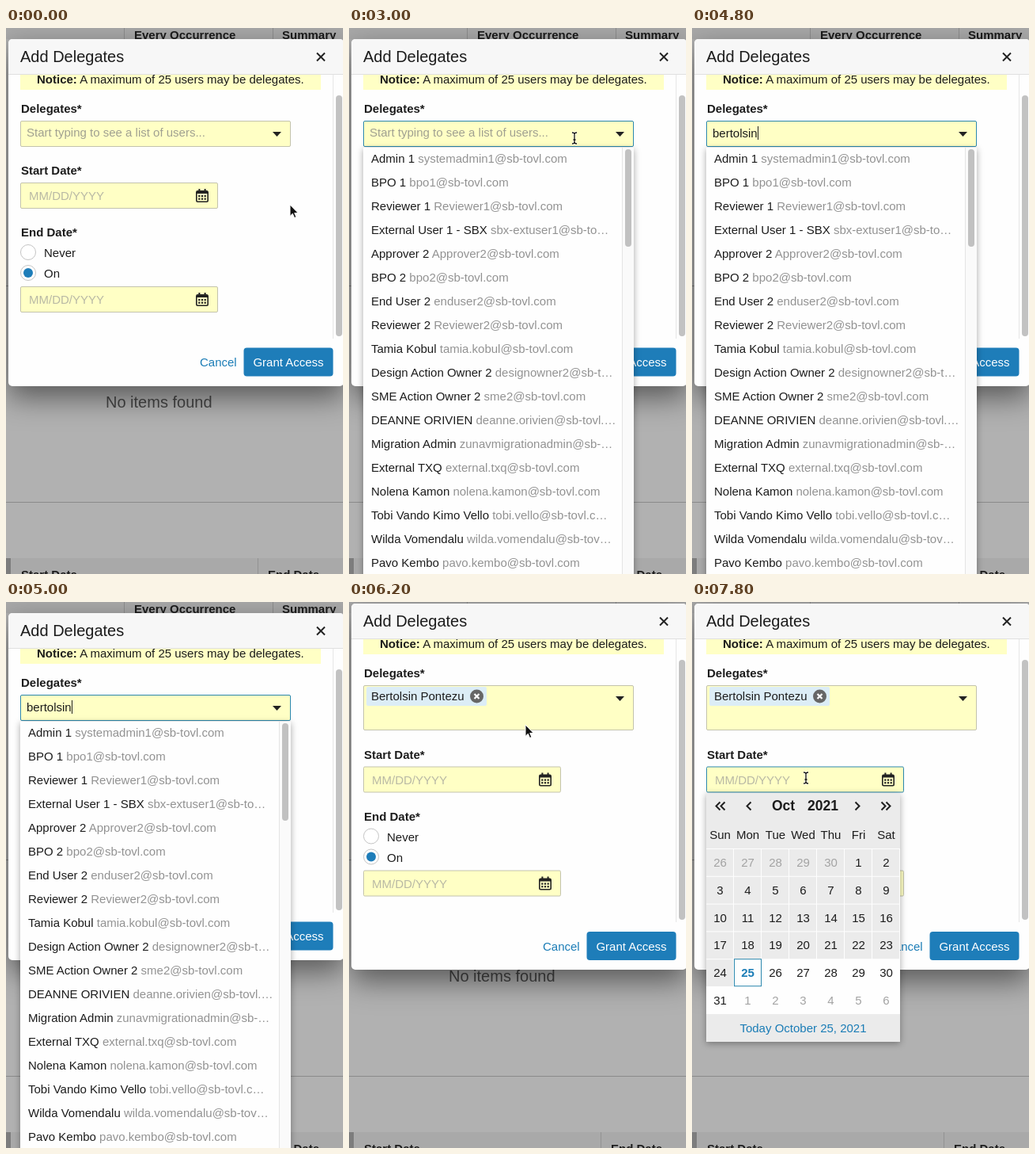
Write an HTML page that moves like this. It is 426x689 px and loops after 8000 ms.

```html
<!DOCTYPE html>
<html lang="en">
<head>
<meta charset="utf-8">
<title>Add Delegates</title>
<style>
  html, body { margin: 0; width: 100%; height: 100%; overflow: hidden; background: #b1b1b1; }
  svg { display: block; width: 426px; height: 689px; }
  text { font: 15px "Liberation Sans", Arial, sans-serif; fill: #1c1c1c; white-space: pre; }
  .b { font-weight: bold; }
  .title { font-size: 20px; }
  .month { font-size: 17.5px; font-weight: bold; }
  .hint { fill: #b9b9a5; }
  .prompt { fill: #a0a091; }
  .mail { fill: #929292; }
  .off { fill: #a3a3a3; }
  .link { fill: #1a7cb6; }
  .white { fill: #fff; }
  .mid { text-anchor: middle; }
  .field { fill: #ffffc5; stroke: #c3c3ad; }
  .focusing { stroke: #9fb3ab; }
  .focus { stroke: #2b87ad; }
  .line { fill: none; stroke: #222; stroke-width: 2; }
  .shadow { filter: drop-shadow(0 14px 18px rgba(0, 0, 0, .5)); }
  .soft { filter: drop-shadow(0 2px 4px rgba(0, 0, 0, .35)); }
</style>
</head>
<body>
<svg id="stage" viewBox="0 0 426 689"></svg>
<script>
const LOOP = 8000, STEP = 200;
const OPEN = 2400, TYPE = 3400, FILTER = 5200, PICK = 6200, FOCUS = 7000, CALENDAR = 7200;
const QUERY = 'bertolsin', PERSON = 'Bertolsin Pontezu';

const text = (x, y, s, cls = '') => `<text x="${x}" y="${y}" class="${cls}">${s}</text>`;
const rect = (x, y, w, h, fill, more = '') =>
  `<rect x="${x}" y="${y}" width="${w}" height="${h}" fill="${fill}" ${more}/>`;
const field = (x, y, w, h, id = '') =>
  `<rect ${id && `id="${id}"`} class="field" x="${x}" y="${y}" width="${w}" height="${h}" rx="1.5"/>`;
const path = (d, more = 'class="line"') => `<path d="${d}" ${more}/>`;
const group = (id, body, more = '') => `<g id="${id}" ${more}>${body}</g>`;
const bold = s => `<tspan class="b">${s}</tspan>`;

function calendarIcon(x, y) {
  let dots = '';
  for (let i = 0; i < 6; i++) dots += rect(x + 3.2 + i % 3 * 3.7, y + 8 + (i > 2) * 3.6, 2.2, 2.2, '#222');
  return rect(x + .8, y + 2.8, 14.4, 13.4, 'none', 'stroke="#222" stroke-width="1.6" rx="1.5"') +
    rect(x + 1, y + 3, 14, 3, '#222') +
    rect(x + 3.4, y, 2, 4, '#222') + rect(x + 10.6, y, 2, 4, '#222') + dots;
}

const dateField = (y, id) => field(18.5, y + .5, 249, 32, id) +
  text(29, y + 22, 'MM/DD/YYYY', 'hint') + calendarIcon(240, y + 8);

const radio = (y, label, on) =>
  `<circle cx="28" cy="${y}" r="9.5" fill="#fff" stroke="#c4c4c4"/>` +
  (on ? `<circle cx="28" cy="${y}" r="6" fill="#1e7db9"/>` : '') + text(48, y + 6, label);

function page() {
  return rect(0, 0, 426, 689, '#b1b1b1') + rect(0, 0, 426, 14, '#a9a9a9') +
    rect(149, 0, 1, 14, '#8e8e8e') + rect(337, 0, 1, 14, '#8e8e8e') +
    text(162, 14, 'Every Occurrence', 'b') + text(349, 14, 'Summary', 'b') +
    rect(0, 325, 4, 1, '#858585') +
    `<text x="126" y="479" class="title" style="fill:#464646">No items found</text>` +
    rect(0, 598, 426, 1, '#8b8b8b') + rect(0, 669, 426, 20, '#a9a9a9') +
    rect(0, 669, 6, 20, '#7d7d7d') + rect(318, 669, 1, 20, '#929292') +
    text(19, 695, 'Start Date', 'b') + text(331, 695, 'End Date', 'b');
}

function dialog() {
  const frame = `<rect id="panel" class="shadow" x="3" width="424" rx="5" fill="#fefefe"/>` +
    rect(413, 46, 1, 346, '#e6e6e6', 'id="track"') +
    rect(417, 85, 8, 304, '#c2c2c2', 'id="thumb" rx="4"');
  const top = path('M3 58V19a5 5 0 0 1 5-5H422a5 5 0 0 1 5 5V58Z', 'fill="#f7f7f7"') +
    rect(3, 58, 424, 1, '#e0e0e0') + text(18, 43, 'Add Delegates', 'title') +
    path('M393 31.500l10 10m0-10l-10 10') +
    rect(18, 59, 380, 19, '#ffffc5') +
    text(39, 70, bold('Notice:') + ' A maximum of 25 users may be delegates.') +
    text(19, 107, 'Delegates*', 'b') +
    field(18.5, 117.5, 341, 32, 'users') +
    path('M337 131h11l-5.500 6Z', 'fill="#222"') +
    `<text id="entry" x="26" y="137"></text>` +
    rect(83, 124, 1, 17, '#222', 'id="entryCaret"') +
    path('M26 139' + 'q1 -2 2 0t2 0'.repeat(14), 'id="squiggle" fill="none" stroke="#e0473c" stroke-width="1.4"') +
    group('chip', rect(22, 119, 152, 24, '#dcedf6', 'rx="2"') + text(28, 136, PERSON) +
      '<circle cx="161.500" cy="131" r="8.500" fill="#666"/>' +
      path('M158.500 128l6 6m0-6l-6 6', 'stroke="#fff" stroke-width="2.200"'));
  const low = text(19, 185, 'Start Date*', 'b') + dateField(195, 'start') +
    rect(29, 203, 1, 17, '#222', 'id="startCaret"') +
    text(19, 263, 'End Date*', 'b') + radio(283, 'Never') + radio(309, 'On', true) + dateField(326) +
    text(245, 427, 'Cancel', 'link') + rect(300.5, 403.5, 113, 36, '#1e7db9', 'rx="4"') +
    text(357, 427, 'Grant Access', 'white mid');
  return frame + group('low', low) + group('top', top);
}

function userList() {
  const at = '@sb-tovl.com';
  const users = [
    ['Admin 1', 'systemadmin1' + at], ['BPO 1', 'bpo1' + at], ['Reviewer 1', 'Reviewer1' + at],
    ['External User 1 - SBX', 'sbx-extuser1@sb-to…'], ['Approver 2', 'Approver2' + at],
    ['BPO 2', 'bpo2' + at], ['End User 2', 'enduser2' + at], ['Reviewer 2', 'Reviewer2' + at],
    ['Tamia Kobul', 'tamia.kobul' + at], ['Design Action Owner 2', 'designowner2@sb-t…'],
    ['SME Action Owner 2', 'sme2' + at], ['DEANNE ORIVIEN', 'deanne.orivien@sb-tovl.…'],
    ['Migration Admin', 'zunavmigrationadmin@sb-…'], ['External TXQ', 'external.txq' + at],
    ['Nolena Kamon', 'nolena.kamon' + at], ['Tobi Vando Kimo Vello', 'tobi.vello@sb-tovl.c…'],
    ['Wilda Vomendalu', 'wilda.vomendalu@sb-tov…'], ['Pavo Kembo', 'pavo.kembo' + at]
  ];
  return rect(18, 151, 342, 550, '#fefefe', 'class="soft"') +
    rect(345, 151, 15, 538, '#fafafa') + rect(345, 151, 1, 538, '#e4e4e4') +
    rect(349, 153, 8, 123, '#c1c1c1', 'rx="4"') +
    users.map(([name, mail], i) =>
      text(28, 170 + i * 30, `${name} <tspan class="mail">${mail}</tspan>`)).join('');
}

function match() {
  const [first, last] = PERSON.split(' ');
  return rect(18, 151, 342, 29, '#ebebeb', 'class="soft"') +
    text(28, 170, `${bold(first)} ${last} <tspan class="mail">${bold(QUERY)}@sb-tovl.com</tspan>`);
}

function calendar() {
  const chevron = (x, dir) => path(`M${x + 2.5 * dir} 252.500l${-5 * dir} 5l${5 * dir} 5`);
  let out = rect(18, 241, 245, 314, '#ebebeb', 'class="soft"') +
    chevron(33, 1) + chevron(39, 1) + chevron(72, 1) +
    chevron(209, -1) + chevron(242, -1) + chevron(248, -1) +
    text(101, 263, 'Oct', 'month') + text(146, 263, '2021', 'month');
  'Sun Mon Tue Wed Thu Fri Sat'.split(' ').forEach((d, i) => out += text(35.5 + i * 35, 299, d, 'mid'));
  out += rect(18, 311, 245, 209, '#fefefe');
  for (let i = 0; i < 42; i++) {
    const x = 18 + i % 7 * 35, y = 311 + Math.floor(i / 7) * 34.8;
    const day = i < 5 ? 26 + i : (i - 5) % 31 + 1;
    const outside = i < 5 || i > 35, today = i === 29;
    if (i < 29) out += rect(x, y + 1, 34, 33.8, '#ebebeb');
    if (today) out += rect(x + .5, y + .5, 34, 34, '#fefefe', 'stroke="#2b87ad"');
    out += text(x + 17.5, y + 23, day, 'mid' + (outside ? ' off' : today ? ' link b' : ''));
  }
  return out + text(140.5, 543, 'Today October 25, 2021', 'mid link');
}

function pointers() {
  const ink = 'fill="#111" stroke="#fff" stroke-width="1" stroke-linejoin="round"';
  const beam = 'M-3 -7q3 0 3 2q0 -2 3 -2M0 -6V6M-3 7q3 0 3 -2q0 2 3 2M-1.500 2h3';
  return group('arrow', path('M0 0V14.500L3.300 11.300 5.600 16.500 7.900 15.500 5.700 10.500H10.200Z', ink)) +
    group('beam', path(beam, 'fill="none" stroke="#fff" stroke-width="3" opacity=".7"') +
      path(beam, 'fill="none" stroke="#111" stroke-width="1.300"')) +
    group('hand', path('M-1.500 1q0-1.500 1.500-1.500t1.500 1.500V5.500q2.300-1 2.800.600q2-.800 2.600.700q2.400-.600 2.400 1.600' +
      'V11.500L8 14V17H.500V14.500L-4 9.500q-.800-2 1-2l1.500 1.300Z',
      'fill="#fff" stroke="#111" stroke-width="1.200" stroke-linejoin="round"') +
      path('M2.300 10.500v3.500m2.200-3.500v3.500m2.200-3.500v3.500', 'stroke="#111"'));
}

const stage = document.getElementById('stage');
stage.innerHTML = page() + dialog() + group('list', userList()) + group('match', match()) +
  group('calendar', calendar()) + group('pointer', pointers());

const $ = id => document.getElementById(id);
const show = (id, on) => $(id).style.display = on ? '' : 'none';
const set = (id, attrs) => Object.entries(attrs).forEach(([k, v]) => $(id).setAttribute(k, v));

// time, x, y of the pointer's hot spot
const route = [[0, 359, 223], [800, 359, 223], [2200, 285, 139], [FILTER, 285, 139],
  [5900, 223, 155], [PICK, 223, 155], [6900, 144, 222], [LOOP, 144, 222]];

function locate(t) {
  const i = route.findIndex(p => p[0] > t);
  const [t0, x0, y0] = route[i - 1], [t1, x1, y1] = route[i];
  const k = (t - t0) / (t1 - t0), e = k * k * (3 - 2 * k);
  return [x0 + (x1 - x0) * e, y0 + (y1 - y0) * e];
}

function render(t) {
  const chosen = t >= PICK, typing = t >= TYPE && !chosen;
  const open = t >= OPEN && !chosen, filtered = t >= FILTER && !chosen;
  const up = chosen ? -12 : 0, down = chosen ? 12.5 : 0;

  set('panel', { y: 14 + up, height: chosen ? 462 : 438 });
  set('track', { y: 58 + up, height: chosen ? 358 : 334 });
  set('thumb', { y: 85 + up, height: chosen ? 328 : 304 });
  set('top', { transform: `translate(0 ${up})` });
  set('low', { transform: `translate(0 ${down})` });
  set('users', { height: chosen ? 56 : 32, class: open ? 'field focus' : 'field' });
  set('start', { class: 'field' + (t >= CALENDAR ? ' focus' : t >= FOCUS ? ' focusing' : '') });

  const letters = Math.min(QUERY.length, Math.floor(1 + (t - TYPE) / 150));
  const entry = $('entry');
  entry.textContent = chosen ? '' : typing ? QUERY.slice(0, letters) : 'Start typing to see a list of users...';
  set('entry', { class: typing ? '' : 'prompt', y: typing ? 138 : 137 });
  show('entryCaret', typing && !filtered);
  if (typing) set('entryCaret', { x: Math.round(26 + entry.getComputedTextLength()) });
  show('squiggle', filtered);
  show('chip', chosen);
  show('startCaret', t >= FOCUS && t < CALENDAR);
  show('list', open && !filtered);
  show('match', filtered);
  show('calendar', t >= CALENDAR);

  const [x, y] = locate(t);
  const overList = filtered && y > 150;
  const overField = !overList && (x < 360 && y > 117 && y < 150 || chosen && x < 235 && y > 208 && y < 240);
  set('pointer', { transform: `translate(${x} ${y})` });
  show('pointer', t < TYPE || t > FILTER);
  show('hand', overList);
  show('beam', overField);
  show('arrow', !overList && !overField);
}

const began = performance.now();
function tick() {
  const t = (performance.now() - began) % LOOP;
  render(Math.floor(t / STEP) * STEP);
  requestAnimationFrame(tick);
}
tick();
</script>
</body>
</html>
```
